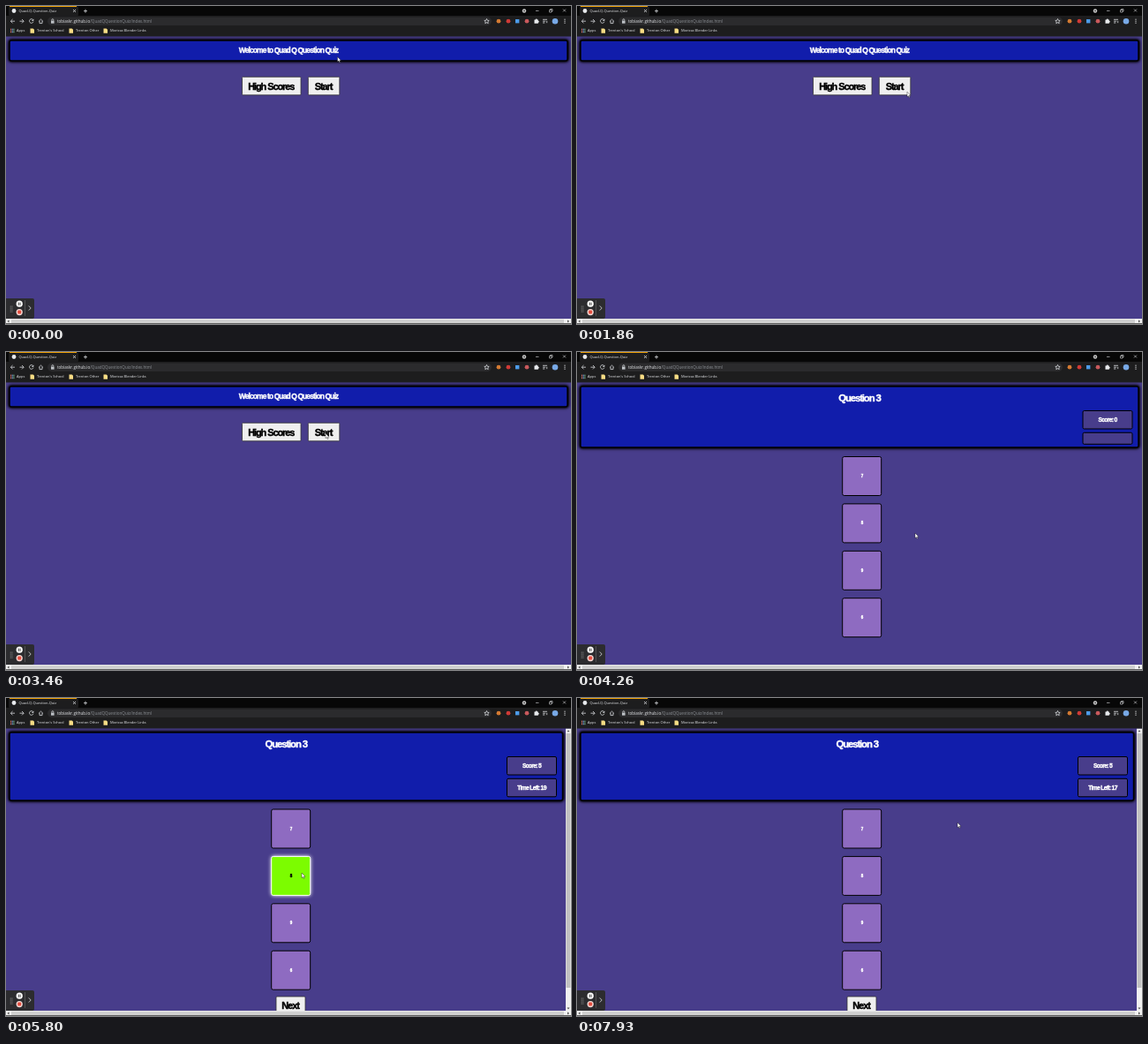
An HTML page for the animation above (8000 ms loop, 640 by 360 pixels).

```html
<!DOCTYPE html>
<html lang="en">
<head>
<meta charset="utf-8">
<title>Quiz walkthrough</title>
<style>
  html, body { margin: 0; width: 100%; height: 100%; overflow: hidden; background: #483d8b; }
  svg { display: block; width: 100%; height: 100%; }
  text { font-family: "Open Sans", "Noto Sans", sans-serif; font-size: 4px; fill: #e8eaed; }
  .url { font-size: 4.55px; }
  .heavy { font-family: "Liberation Sans", sans-serif; font-weight: bold; letter-spacing: -.1em;
    text-anchor: middle; fill: #fff; stroke: #fff; stroke-width: .4px; }
  .dark { fill: #000; stroke: #000; }
  .panel { fill: #111dab; stroke: #000; stroke-width: 1.5px;
    filter: drop-shadow(0 0 1.5px #000) drop-shadow(0 0 1.5px #000); }
  .box { fill: #483d8b; stroke: #000; }
  .answer { fill: #8e6bc1; stroke: #000; }
  .hover .answer { fill: #7cfc00; stroke: #fff; filter: drop-shadow(0 0 2px #fff); }
  .hover text { fill: #000; stroke: #000; }
  .button { fill: #efefef; stroke: #333; stroke-width: .8px; }
  .line { fill: none; stroke: #dadce0; stroke-width: .8px; }
</style>
</head>
<body>
<svg id="stage" viewBox="0 0 640 360"></svg>
<script>
const LOOP = 8000, START = 3500, TIMER = 4500, ANSWERED = 5500;
const stage = document.getElementById('stage');

// Pointer stops: time, x, y
const stops = [
  [0, 375.5, 57.5], [1060, 369, 103.5], [2660, 379, 91], [3450, 362, 92], [3600, 362, 92],
  [4260, 383, 205], [5200, 340, 176], [5500, 335, 198], [6200, 335, 198],
  [6730, 624, 121], [7930, 431, 141], [LOOP, 431, 141]
];

const rect = (x, y, w, h, attrs = '') => `<rect x="${x}" y="${y}" width="${w}" height="${h}" ${attrs}/>`;
const dot = (x, y, r, fill) => `<circle cx="${x}" cy="${y}" r="${r}" fill="${fill}"/>`;
const path = (d, attrs = 'class="line"') => `<path d="${d}" ${attrs}/>`;
const label = (x, y, s, attrs = '') => `<text x="${x}" y="${y}" ${attrs}>${s}</text>`;
const heavy = (x, y, s, size, cls = '') => label(x, y, s, `class="heavy ${cls}" style="font-size:${size}px"`);
const button = (x, y, w, s) =>
  rect(x, y, w, 20.5, 'rx="1" class="button"') + heavy(x + w / 2 - .5, y + 14.3, s, 11, 'dark');

function browser() {
  const bookmark = (x, s) =>
    path(`M${x} 25.5h3.2l1.3 1.3v4h-4.5z`, 'fill="#f7dc84"') + label(x + 7.5, 29.4, s);
  let apps = '';
  for (let i = 0; i < 9; i++) {
    apps += rect(5 + i % 3 * 1.7, 25.7 + Math.floor(i / 3) * 1.7, 1.1, 1.1,
      `fill="${['#e57368', '#8ab4f8', '#81c995'][i % 3]}"`);
  }
  return rect(0, 0, 640, 34.5, 'fill="#1d1d1e"') + rect(0, 0, 640, 11, 'fill="#070707"') +
    rect(3, 0, 79, 11.5, 'rx="2" fill="#1d1d1e"') + rect(4, 0, 76, 1, 'fill="#f0a30a"') +
    dot(9, 5.5, 2.4, '#e8eaed') + label(14.5, 7, 'Quad-Q-Question-Quiz') +
    path('M76 4l3 3m0-3l-3 3M88 5.7h4M90 3.7v4') +
    dot(587, 5.5, 2.2, '#c8c8c8') + dot(587, 5.5, .8, '#222') +
    path('M600 5.5h3.5M615.5 4.5h2.5v2.5h-2.5zM616.5 4.5v-1h2.5v2.5h-1M631 3.5l3 3m0-3l-3 3',
      'class="line" style="stroke-width:.6px"') +
    path('M10 17.2H5.5M7.5 15l-2.2 2.2 2.2 2.2M15.5 17.2H20M18 15l2.2 2.2-2.2 2.2') +
    path('M30.7 15.7a2.3 2.3 0 1 0 .3 2M31 14.8v1.7h-1.7M37 17.5l2.5-2.4 2.5 2.4M38 17v2.6h3V17') +
    rect(47, 12.5, 503, 9.5, 'rx="4.7" fill="#2b2b2d"') +
    rect(51, 16.7, 3.6, 3, 'fill="#bdc1c6"') + path('M51.8 16.7v-1a1 1 0 0 1 2 0v1') +
    label(58, 18.8, 'tobiaskr.github.io<tspan fill="#8b8f94">/QuadQQuestionQuiz/index.html</tspan>',
      'class="url"') +
    path('M544.5 14.5l.8 1.8 1.9.2-1.4 1.3.4 1.9-1.7-1-1.7 1 .4-1.9-1.4-1.3 1.9-.2z') +
    dot(558, 17.2, 2.4, '#d47a32') + dot(569, 17.2, 2.4, '#cf3a36') +
    rect(577, 15, 4.4, 4.4, 'fill="#4c9be8"') + dot(590, 17.2, 2.4, '#c9595c') +
    path('M598.5 15.5h1.3a1 1 0 0 1 2 0h1v1.3a1 1 0 0 1 0 2v1h-4.3z', 'fill="#e8eaed"') +
    path('M608 15.3h5M608 17.2h3.2M608 19h2.4M612.7 16.8v2.4') +
    dot(622, 17.2, 3.3, '#78a9e6') +
    [15.2, 17.2, 19.2].map(y => dot(633, y, .6, '#e8eaed')).join('') +
    apps + label(12, 29.4, 'Apps') + bookmark(27.5, "Trenton's School") +
    bookmark(71.5, 'Trenton Other') + bookmark(110.5, 'Marissa Blender Links');
}

function welcome() {
  return rect(4, 39, 632, 23, 'rx="2" class="panel"') +
    heavy(320, 53, 'Welcome to Quad Q Question Quiz', 8.4) +
    button(267.5, 80.3, 66.5, 'High Scores') + button(342.3, 80.3, 35.5, 'Start');
}

function question(t, x, y) {
  const timed = t >= TIMER, done = t >= ANSWERED;
  const shift = done ? -5.5 : 0, top = timed ? 126 : 118.5;
  const left = 20 - Math.floor((t - TIMER) / 1000);
  let out = rect(4, 39, 632 + shift, timed ? 77 : 69, 'rx="2" class="panel"') +
    heavy(320 + shift / 2, 56, 'Question 3', 11.4) +
    rect(573 + shift, 66.5, 56, 20.5, 'rx="1.5" class="box"') +
    heavy(601 + shift, 79.2, `Score: ${done ? 5 : 0}`, 6.7) +
    rect(573 + shift, 91.3, 56, timed ? 20.5 : 13, 'rx="1.5" class="box"');
  if (timed) out += heavy(601 + shift, 104, `Time Left: ${left}`, 6.7);
  ['7', '8', '9', '6'].forEach((s, i) => {
    const boxTop = top + i * 53.4;
    const over = Math.abs(x - 322.7) < 24 && Math.abs(y - boxTop - 22) < 26;
    out += `<g class="${over ? 'hover' : ''}">` +
      rect(300.7, boxTop, 44, 44, 'rx="2" class="answer"') +
      heavy(322.7, boxTop + 23.5, s, 4.5) + '</g>';
  });
  if (done) {
    out += button(306, 338, 33, 'Next') + rect(634, 34.5, 6, 320, 'fill="#f1f1f1"') +
      rect(634.5, 40, 5, 288, 'fill="#c1c1c1"') +
      path('M635.5 38.3l1.5-2 1.5 2zM635.5 350.5l1.5 2 1.5-2z', 'fill="#505050"');
  }
  return out;
}

function footer() {
  const grip = [0, 1, 2, 3].map(i => dot(5.2, 340 + i * 2, .5, '#aaa') + dot(7, 340 + i * 2, .5, '#aaa'));
  return rect(0, 354, 640, 6, 'fill="#f1f1f1"') + rect(6, 354.7, 626, 4.3, 'fill="#d0d0d0"') +
    rect(0, 359.3, 640, 1, 'fill="#222"') +
    path('M3.5 355.3l-2 1.6 2 1.6zM636 355.3l2 1.6-2 1.6z', 'fill="#505050"') +
    rect(-3, 331, 35, 23, 'rx="2" fill="#2c2c2f"') + grip.join('') +
    dot(15.2, 337.2, 3.6, '#fff') + path('M14.3 335.6v3.2M16.1 335.6v3.2', 'stroke="#333" stroke-width=".9"') +
    dot(15.2, 346.6, 3.6, '#f3d9d5') + rect(13.2, 344.6, 4, 4, 'rx="1" fill="#e34b3d"') +
    path('M21.5 333v18', 'stroke="#777" stroke-width=".5"') + path('M25.7 339.4l2.5 2.6-2.5 2.6');
}

function pointer(t) {
  const i = stops.findIndex(s => s[0] > t);
  const [t0, x0, y0] = stops[i - 1], [t1, x1, y1] = stops[i];
  const p = (t - t0) / (t1 - t0), e = p * p * (3 - 2 * p);
  return [x0 + (x1 - x0) * e, y0 + (y1 - y0) * e];
}

stage.innerHTML = rect(0, 0, 640, 360, 'fill="#483d8b"') +
  '<g id="page"></g>' + browser() + footer() +
  path('M0 0v5.6l1.3-1.1.9 2 .9-.4-.9-1.9h1.8z', 'id="pointer" fill="#fff" stroke="#111" stroke-width=".4"');
const page = document.getElementById('page'), arrow = document.getElementById('pointer');
let shown = '';

function draw() {
  const t = performance.now() % LOOP, [x, y] = pointer(t);
  const content = t < START ? welcome() : question(t, x, y);
  if (content !== shown) page.innerHTML = shown = content;
  arrow.setAttribute('transform', `translate(${x} ${y})`);
  requestAnimationFrame(draw);
}
draw();
</script>
</body>
</html>
```
